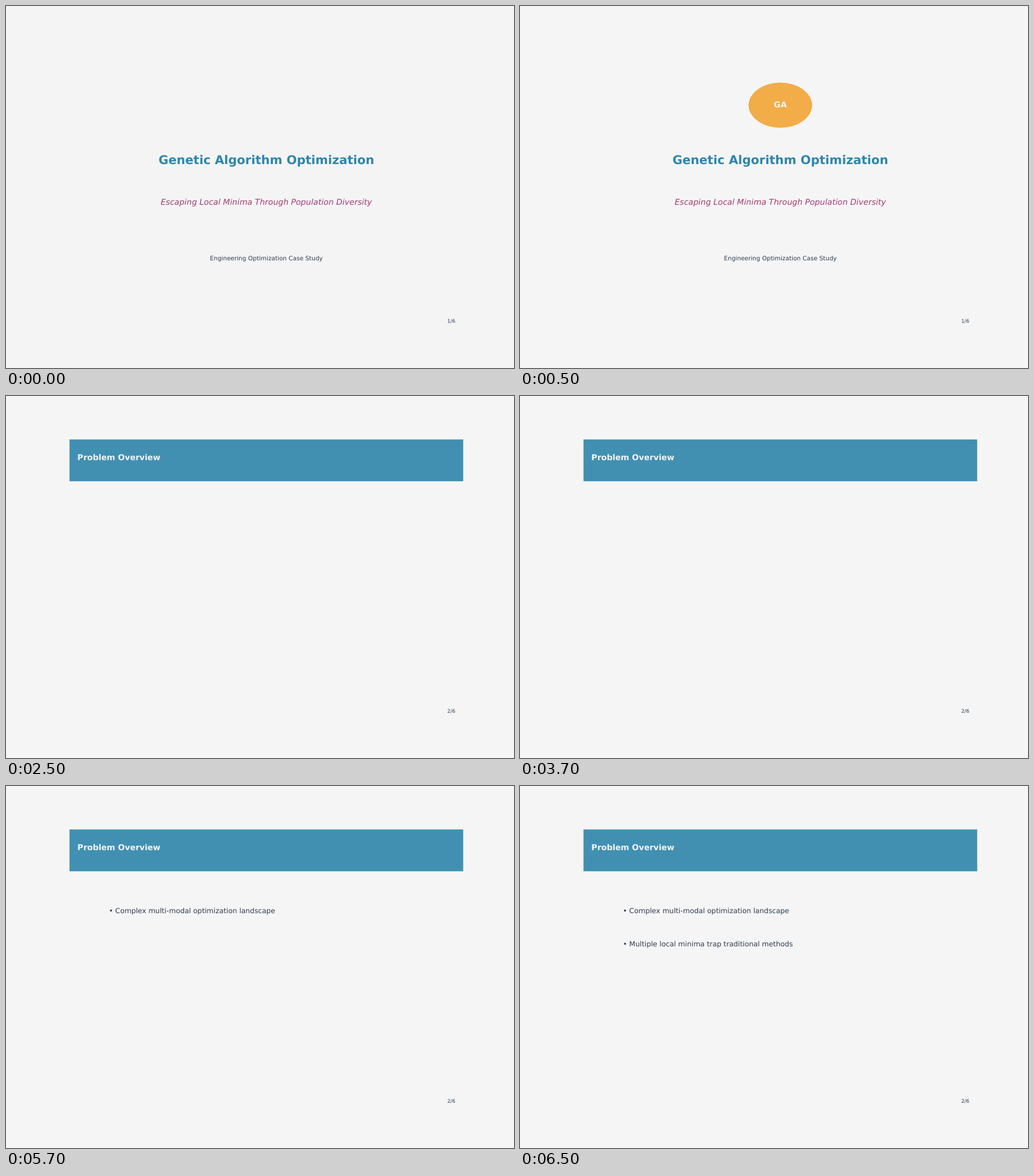
Write an HTML page with a canvas that moves like this. It is 885 px wide and 632 px high and loops after 8 s.

```html
<!DOCTYPE html>
<html lang="en">
<head>
<meta charset="utf-8">
<title>Genetic Algorithm Optimization</title>
<style>
  html, body { margin: 0; width: 100%; height: 100%; overflow: hidden; background: #f5f5f5; }
  canvas { display: block; width: 885px; height: 632px; }
</style>
</head>
<body>
<canvas id="stage"></canvas>
<script>
const W = 885, H = 632, LOOP = 8000;
const PT = W / 14 / 72;
const AX = { x: W * 0.125, y: H * 0.12, w: W * 0.775, h: H * 0.77 };
const BLUE = '#2e86ab', PURPLE = '#a23b72', ORANGE = '#f18f01', INK = '#2c3e50', PAPER = '#f5f5f5';
const BULLETS = [
  [4500, 'Complex multi-modal optimization landscape'],
  [6500, 'Multiple local minima trap traditional methods']
];

const canvas = document.getElementById('stage');
const ctx = canvas.getContext('2d');
const ratio = window.devicePixelRatio || 1;
canvas.width = Math.round(W * ratio);
canvas.height = Math.round(H * ratio);
ctx.scale(ratio, ratio);

// Slide coordinates run from 0 to 1, with y pointing up.
const px = x => AX.x + x * AX.w;
const py = y => AX.y + (1 - y) * AX.h;

function text(str, x, y, pt, color, { style = '', align = 'left', middle = false } = {}) {
  const size = pt * PT;
  ctx.font = `${style} ${size}px "DejaVu Sans", sans-serif`;
  ctx.textRendering = 'geometricPrecision';
  ctx.textAlign = align;
  ctx.fillStyle = color;
  ctx.fillText(str, px(x), py(y) + (middle ? 0.276 * size : 0));
}

function titleSlide(t) {
  const mid = style => ({ style, align: 'center', middle: true });
  text('Genetic Algorithm Optimization', 0.5, 0.6, 24, BLUE, mid('bold'));
  text('Escaping Local Minima Through Population Diversity', 0.5, 0.45, 16, PURPLE, mid('italic'));
  text('Engineering Optimization Case Study', 0.5, 0.25, 12, INK, mid(''));
  if (t < 500) return;
  ctx.globalAlpha = 0.7;
  ctx.fillStyle = ctx.strokeStyle = ORANGE;
  ctx.lineWidth = PT;
  ctx.beginPath();
  ctx.ellipse(px(0.5), py(0.8), 0.08 * AX.w, 0.08 * AX.h, 0, 0, Math.PI * 2);
  ctx.fill();
  ctx.stroke();
  ctx.globalAlpha = 1;
  text('GA', 0.5, 0.8, 16, PAPER, mid('bold'));
}

function overviewSlide(t) {
  ctx.globalAlpha = 0.9;
  ctx.fillStyle = BLUE;
  ctx.fillRect(px(0), py(1), AX.w, 0.15 * AX.h);
  ctx.globalAlpha = 1;
  text('Problem Overview', 0.02, 0.925, 16, PAPER, { style: 'bold' });
  BULLETS.forEach(([start, label], i) => {
    if (t >= start) text('• ' + label, 0.1, 0.7 - 0.12 * i, 14, INK);
  });
}

function draw(t) {
  ctx.fillStyle = t < 500 ? '#f4f4f4' : PAPER;
  ctx.fillRect(0, 0, W, H);
  const first = t < 2500;
  (first ? titleSlide : overviewSlide)(t);
  text(first ? '1/6' : '2/6', 0.98, 0.02, 10, INK, { align: 'right' });
}

let origin;
function tick(now) {
  origin ??= now;
  draw((now - origin) % LOOP);
  requestAnimationFrame(tick);
}
draw(0);
requestAnimationFrame(tick);
</script>
</body>
</html>
```
